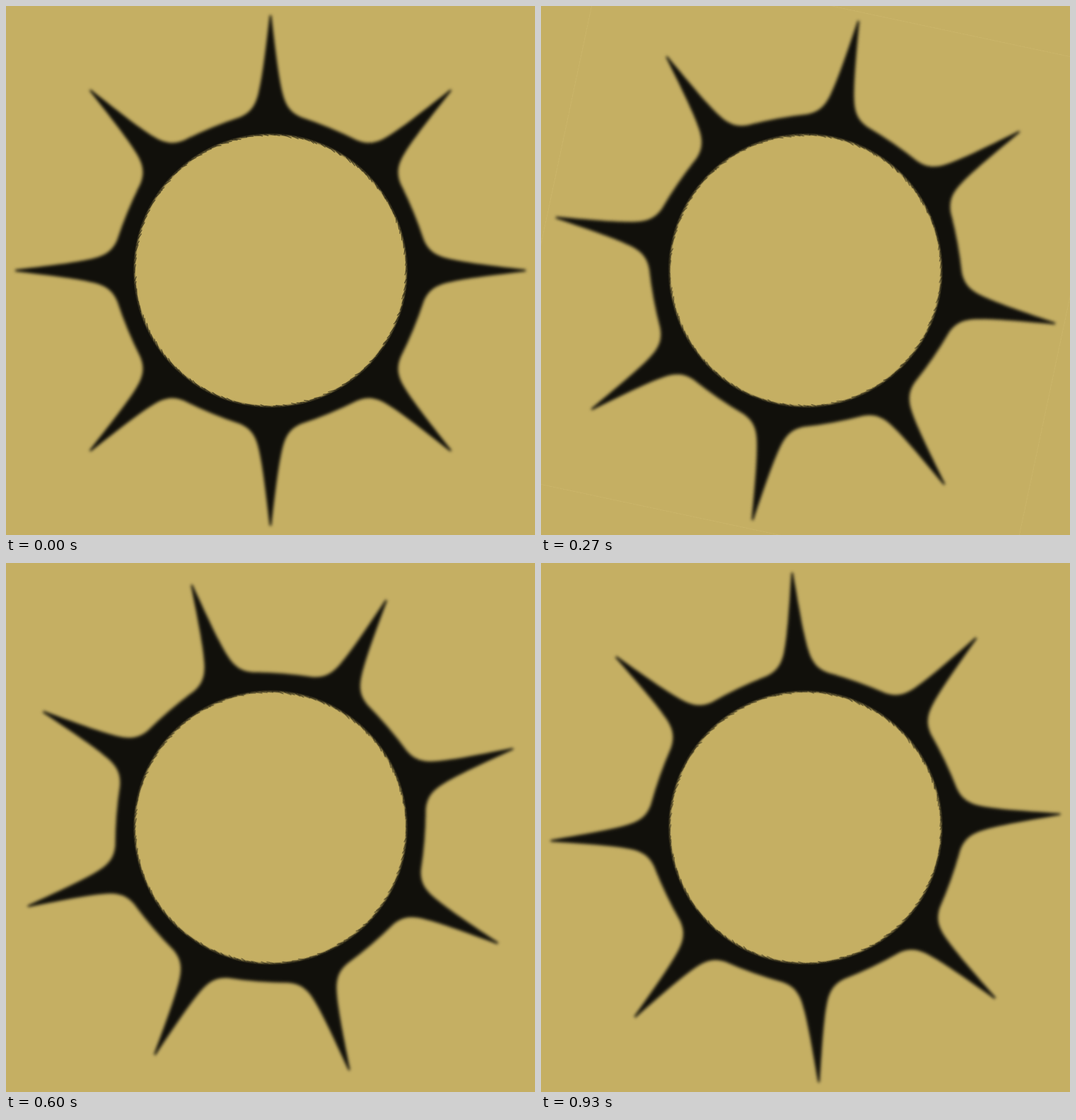
These frames come from a looping animation (748 by 748 pixels, 0.99 s). An HTML page:

```html
<!DOCTYPE html>
<html lang="en">
<head>
<meta charset="utf-8">
<title>Turning sun</title>
<style>
  html, body { margin: 0; width: 100%; height: 100%; overflow: hidden; background: #c5af63; }
  svg { display: block; width: 100%; height: 100%; overflow: hidden; }
</style>
</head>
<body>
<svg viewBox="0 0 748 748">
  <defs>
    <filter id="soft" filterUnits="userSpaceOnUse" x="-374" y="-374" width="748" height="748" color-interpolation-filters="sRGB">
      <feGaussianBlur stdDeviation="1.9"/>
    </filter>
    <filter id="crisp" filterUnits="userSpaceOnUse" x="-220" y="-220" width="440" height="440" color-interpolation-filters="sRGB">
      <feGaussianBlur stdDeviation="0.8"/>
    </filter>
  </defs>
  <g transform="translate(374 374)">
    <g id="sun">
      <rect id="seam" x="-373.5" y="-373.5" width="747" height="747" fill="none" stroke="#dcc47c" stroke-opacity=".22"/>
      <path id="body" fill="#11100b" filter="url(#soft)"/>
      <circle r="192.3" fill="#c5af63" filter="url(#crisp)"/>
      <path id="hairs" fill="none" stroke="#16140d" stroke-width="1.2" stroke-linecap="round" stroke-opacity=".6"/>
    </g>
  </g>
</svg>
<script>
  const LOOP = 990, STEPS = 15, SPIKES = 8, TURN = 360 / SPIKES;
  const get = id => document.getElementById(id);
  const rad = deg => deg * Math.PI / 180;
  const num = v => v.toFixed(2);
  const polar = (r, a) => num(r * Math.cos(a)) + ' ' + num(r * Math.sin(a));

  // Right-hand outline of one spike, from its tip down to the ring.
  const side = [[1.2, -361], [8.2, -300], [12, -272], [17, -251], [22, -230], [31, -222], [44, -216.5]];

  // One spike, then the slightly bulging rim up to the next one.
  function spikePath(i) {
    const a = rad(i * TURN), c = Math.cos(a), s = Math.sin(a);
    const left = side.map(([x, y]) => [-x, y]).reverse();
    const p = [...left, ...side].map(([x, y]) => num(x * c - y * s) + ' ' + num(x * s + y * c));
    const next = rad((i + 1) * TURN), [ex, ey] = left[0];
    const end = num(ex * Math.cos(next) - ey * Math.sin(next)) + ' ' +
      num(ex * Math.sin(next) + ey * Math.cos(next));
    return `${i ? '' : 'M' + p[0]} C${p.slice(1, 4).join()} C${p.slice(4, 7).join()}` +
      ` L${p[7]} C${p.slice(8, 11).join()} C${p.slice(11, 14).join()}` +
      ` Q${polar(220, a + rad(TURN / 2 - 90))},${end}`;
  }

  get('body').setAttribute('d', Array.from({ length: SPIKES }, (_, i) => spikePath(i)).join(' ') + 'Z');

  let seed = 17;
  const rand = () => (seed = seed * 16807 % 2147483647) / 2147483647;

  // Short slanted brush hairs along the inner edge of the ring.
  function hair(i, count) {
    const a = rad((i + rand() * 0.7) * 360 / count);
    const b = a + (5 + rand() * 5) / 192;
    return `M${polar(192.5, a)}L${polar(192.2 - rand() * 2.5, b)}`;
  }

  const HAIRS = 150;
  get('hairs').setAttribute('d', Array.from({ length: HAIRS }, (_, i) => hair(i, HAIRS)).join(''));

  // Held poses, three degrees apart, on a 10 ms clock.
  function play(el, pose) {
    const frames = Array.from({ length: STEPS }, (_, n) => ({
      offset: Math.round(n * 20 / 3) * 10 / LOOP,
      easing: 'steps(1, end)',
      ...pose(n * TURN / STEPS)
    }));
    frames.push({ ...frames[STEPS - 1], offset: 1 });
    el.animate(frames, { duration: LOOP, iterations: Infinity });
  }

  play(get('sun'), deg => ({ transform: `rotate(${deg}deg)` }));
  play(get('seam'), deg => ({ opacity: deg > 0 && deg <= 18 ? 1 : 0 }));
</script>
</body>
</html>
```
